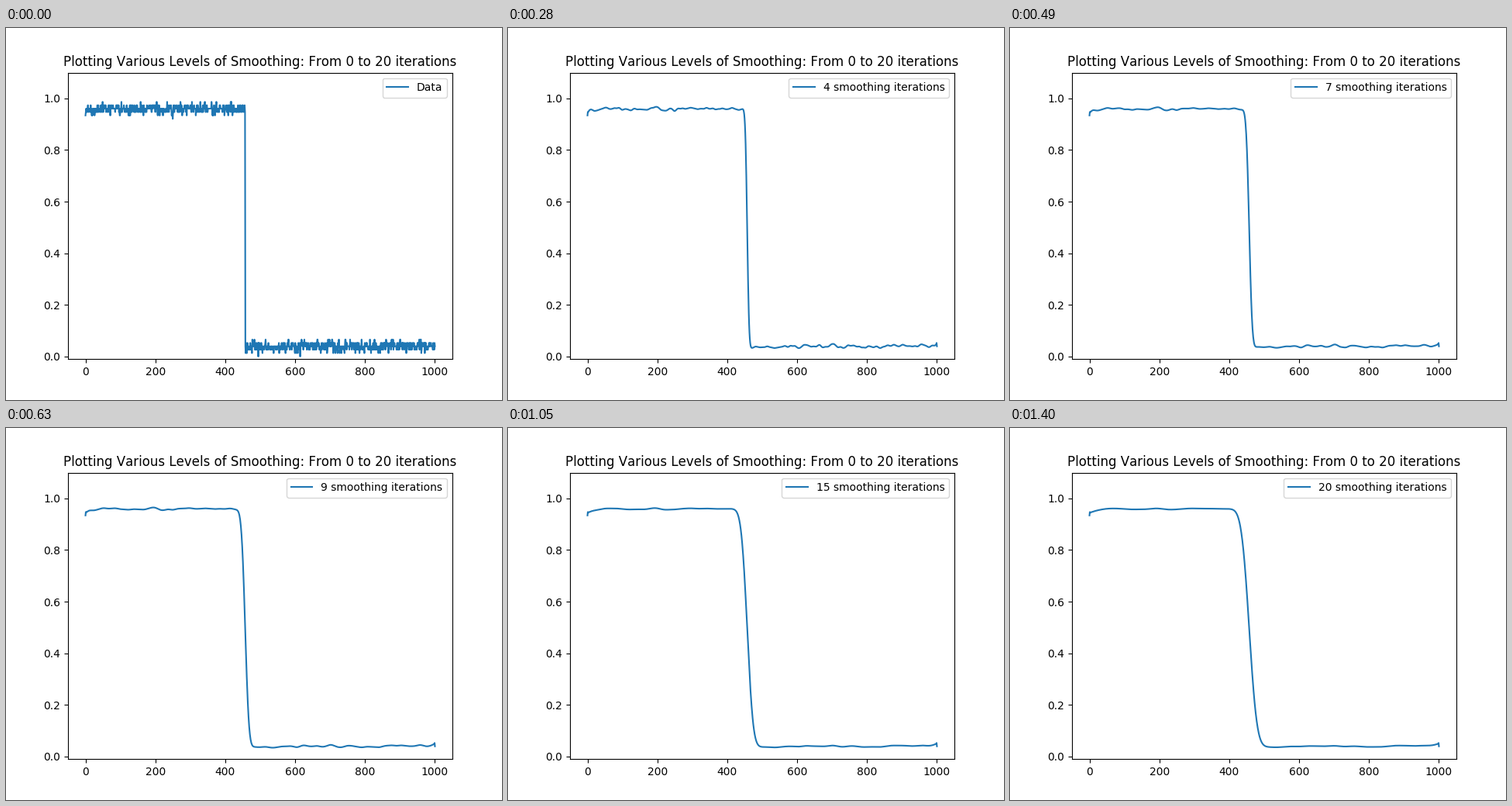
Recreate the animation shown at these times as a matplotlib script. Size 640 px wide and 480 px high, loop 1470 ms.

```python
import numpy as np
import matplotlib.pyplot as plt
from matplotlib.animation import FuncAnimation

LEVELS = 20
COUNT = 1002
STEP_AT = 458         # first sample after the drop
UNIT = 76             # the signal is quantised in 1/76
HIGH, LOW = 73, 3     # the two plateaus, in units

plt.rcParams["text.kerning_factor"] = 6


def make_signal():
    """A noisy step, quantised and clipped to the range 0 to 1."""
    rng = np.random.default_rng(7)
    noise = np.clip(np.round(rng.normal(0, 0.95, COUNT)), -3, 3)
    units = np.where(np.arange(COUNT) < STEP_AT, HIGH, LOW) + noise
    units[:2] = HIGH - 2, HIGH - 1
    units[-2:] = LOW + 1, LOW
    return units / UNIT


def smooth(y):
    """Five-point triangular smooth; two samples at each end stay fixed."""
    out = y.copy()
    out[2:-2] = np.convolve(y, np.array([1, 2, 3, 2, 1]) / 9, mode="valid")
    return out


def make_curves():
    y = make_signal()
    curves = [y]
    for level in range(1, LEVELS + 1):
        # every level smooths the previous curve further
        for _ in range(level + 1):
            y = smooth(y)
        curves.append(y)
    return curves


curves = make_curves()

fig, ax = plt.subplots(figsize=(6.4, 4.8), dpi=100)
line, = ax.plot(np.arange(COUNT), curves[0], color="#1f77b4", lw=1.5)
ax.set_ylim(-0.01, 1.1)
ax.set_title("Plotting Various Levels of Smoothing: From 0 to 20 iterations")


def draw(level):
    line.set_ydata(curves[level])
    line.set_label(f"{level} smoothing iterations" if level else "Data")
    ax.legend(loc="upper right")
    return line,


anim = FuncAnimation(fig, draw, frames=LEVELS + 1, interval=70,
                     repeat=True, repeat_delay=0, blit=False)
plt.show()
```
